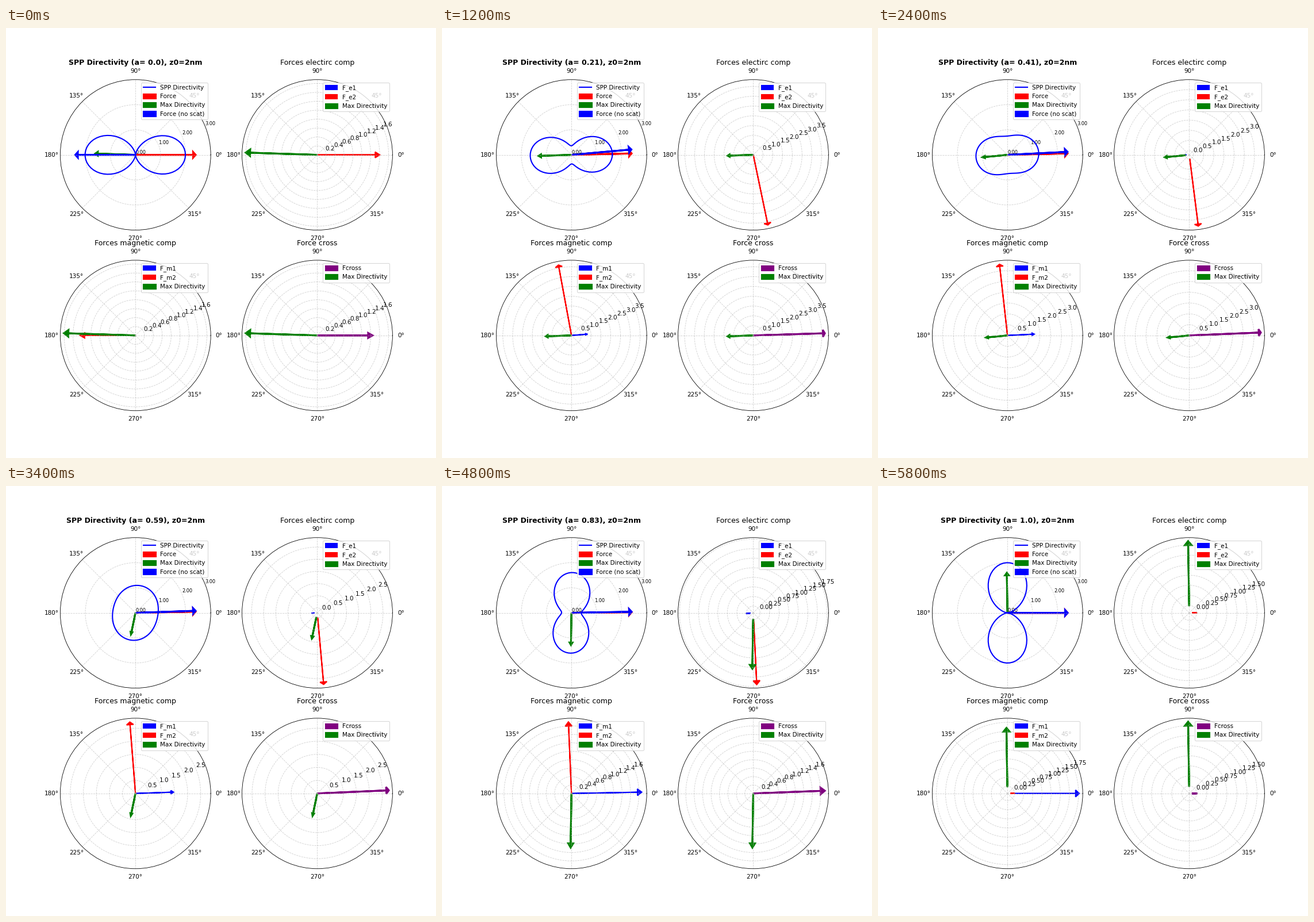
A matplotlib script that plays this animation: 748x748 px, repeating every 6000 ms.

```python
import numpy as np
import matplotlib.pyplot as plt
from matplotlib.animation import FuncAnimation
from matplotlib.patches import Patch

N = 30
THETA = np.linspace(0, 2 * np.pi, 100)
TINY = 1e-9

plt.rcParams["font.family"] = "DejaVu Sans"
fig, axes = plt.subplots(2, 2, figsize=(10, 10), dpi=74.8,
                         subplot_kw={"projection": "polar"})
spp, elec, magn, cross = axes.flat


def setup(ax, title, entries, first=()):
    ax.grid(True, linestyle="--", alpha=0.6)
    ax.set_title(title)
    swatches = [Patch(color=c, lw=lw, label=name) for name, c, lw in entries]
    ax.legend(handles=[*first, *swatches], loc="upper right")


curve, = spp.plot(THETA, np.ones_like(THETA), color="blue", lw=2,
                  label="SPP Directivity")
spp.set_ylim(0, 3)
spp.set_yticks(range(4), [f"{r:.2f}" for r in range(4)], fontsize=8)

BEST = ("Max Directivity", "green", 3)
setup(spp, "", [("Force", "red", 3), BEST, ("Force (no scat)", "blue", 3)], [curve])
setup(elec, "Forces electirc comp", [("F_e1", "blue", 2), ("F_e2", "red", 2), BEST])
setup(magn, "Forces magnetic comp", [("F_m1", "blue", 2), ("F_m2", "red", 2), BEST])
setup(cross, "Force cross", [("Fcross", "purple", 3), BEST])


def directivity(a):
    """Lobe pattern turning from horizontal (a=0) to vertical (a=1)."""
    total = 1 - a + 0.85 * a
    c = (1 - a - 0.85 * a) / total
    s = 0.078 * np.sqrt(a * (1 - a)) / total
    bias = 0.01 * (1 - a)
    return 1 + c * np.cos(2 * THETA) + s * np.sin(2 * THETA) - bias * np.cos(THETA)


def forces(a):
    """Electric and magnetic force vectors, direct (1) and scattered (2)."""
    mix = np.sqrt(a * (1 - a))
    norm = 0.17 + 0.395 * a
    e1 = -0.034 * np.array([1 - a, 0.041 * mix]) / norm
    e2 = np.array([0.238 * (1 - a), -2.233 * mix]) / norm
    m1 = np.array([a, 0.041 * mix]) / norm
    m2 = np.array([-0.211 * (1 - a), 2.233 * mix]) / norm
    return e1, e2, m1, m2


def polar(v):
    x, y = v + 0.0  # turns -0.0 into 0.0
    return np.arctan2(y, x), np.hypot(x, y)


def arrow(ax, angle, length, color, lw):
    if length > 0:
        ax.arrow(angle, 0, 0, length, color=color, lw=lw, head_width=0.1,
                 head_length=0.1, length_includes_head=True)


def update(i):
    a = i / (N - 1)
    for ax in axes.flat:
        for p in list(ax.patches):
            p.remove()
        ax.relim()

    d = directivity(a)
    curve.set_ydata(d)
    k = np.argmax(np.round(d, 10))
    best = THETA[k], 0.8 * d[k], "green", 3
    e1, e2, m1, m2 = forces(a)

    spp.set_title(f"SPP Directivity (a= {round(a, 2)}), z0=2nm", fontweight="bold")
    arrow(spp, 0.065 * np.sqrt(a) * (1 - a), 2.4, "red", 3)
    arrow(spp, *best)
    arrow(spp, polar(e1 + m1)[0], 2.4, "blue", 3)

    for ax, direct, scattered in ((elec, e1, e2), (magn, m1, m2)):
        arrow(ax, *polar(direct), "blue", 2)
        angle, size = polar(scattered)
        arrow(ax, angle, max(size, TINY), "red", 2)
        arrow(ax, *best)

    angle = 0.0855 * a**0.6 * (1 - a)**0.4
    arrow(cross, angle, max(polar(m2)[1], TINY), "purple", 3)
    arrow(cross, *best)
    return []


anim = FuncAnimation(fig, update, frames=N, interval=200, repeat=True,
                     repeat_delay=0, init_func=lambda: update(0))
plt.show()
```
